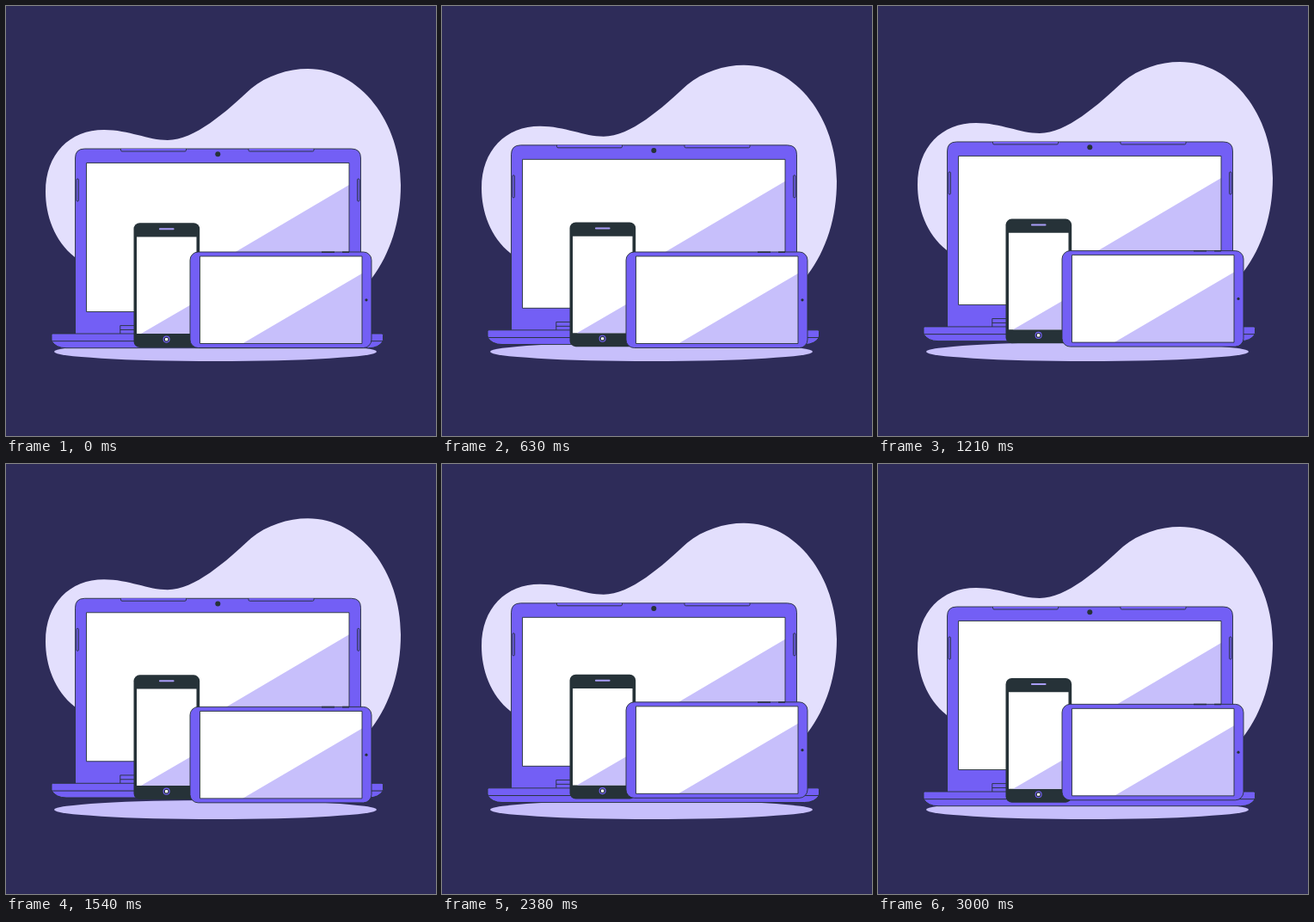
An HTML page for the animation above (3.04 s loop, 500 by 500 pixels).

```html
<!DOCTYPE html>
<html lang="en">
<head>
<meta charset="utf-8">
<title>Floating devices</title>
<style>
  html, body { margin: 0; height: 100%; overflow: hidden; background: #2e2c59; }
  svg { display: block; width: 100%; height: 100%; }
  .body { fill: #735ff5; }
  .line { stroke: #263238; stroke-width: .9; }
  .dark { fill: #263238; }
  .tint { fill: #c7bffb; }
  .white { fill: #fff; }
  .none { fill: none; }
</style>
</head>
<body>
<svg viewBox="0 0 500 500">
  <g id="blob">
    <path fill="#e3dffd" d="M80 292C56 273 46 243 46 216C46 172 74 144 114 144C143 144 165 156 188 156C219 156 256 123 285 96C303 81 328 73 351 73C412 73 459 135 459 208C459 250 447 288 425 317L400 345H100Z"/>
  </g>
  <ellipse class="tint" cx="243.5" cy="402" rx="187.5" ry="11"/>

  <g id="laptop">
    <path class="body line" d="M80.5 382V177Q80.5 166 91.5 166H401.5Q412.5 166 412.5 177V382Z"/>
    <path class="white" d="M93.5 182.5H399V355.5H93.5Z"/>
    <path class="tint" d="M399 208V355.5H149Z"/>
    <path class="none line" d="M93.5 182.5H399V355.5H93.5Z"/>
    <path class="body line" d="M133.5 166V167.5Q133.5 169 135 169H208Q209.5 169 209.5 167.5V166M282 166V167.5Q282 169 283.5 169H356.5Q358 169 358 167.5V166"/>
    <rect class="body line" x="82" y="201" width="2.4" height="26" rx="1"/>
    <rect class="body line" x="408.6" y="201" width="2.4" height="26" rx="1"/>
    <circle class="dark" cx="246.3" cy="172.2" r="3"/>
    <path class="none line" d="M132.8 381V371.6H360V381M132.8 376.5H360"/>
    <path class="body line" d="M53 389.5Q58 397.7 70 397.7H421.5Q433.500 397.7 438.500 389.5Z"/>
    <rect class="body line" x="53" y="381" width="385.5" height="8.700" rx="1.500"/>
  </g>

  <g id="phone">
    <rect class="dark" x="148.500" y="252.300" width="76.700" height="144.700" rx="7"/>
    <path class="white" d="M152 268.500H221.500V381H152Z"/>
    <path class="tint" d="M157 381L221.500 343.500V381Z"/>
    <rect class="tint" x="178" y="258.300" width="17.500" height="2" rx=".8" style="fill:#a99df8"/>
    <circle cx="186.600" cy="387.600" r="3.500" fill="none" stroke="#735ff5" stroke-width="1.100"/>
    <rect class="white" x="185" y="386" width="3.200" height="3.200" rx=".6"/>
  </g>

  <g id="tablet">
    <rect class="body line" x="214" y="286" width="211" height="111.500" rx="9.500"/>
    <path class="white" d="M225.500 291H414V392.500H225.500Z"/>
    <path class="tint" d="M275 392.500L414 311V392.500Z"/>
    <path class="none line" d="M225.500 291H414V392.500H225.500Z"/>
    <path class="dark" d="M367 285.400H382V287H367ZM391 285.400H399V287H391Z"/>
    <circle class="dark" cx="419" cy="341.800" r="1.600"/>
  </g>
</svg>
<script>
  const LOOP = 3040, FPS = 24, LAST = 72, RISE = 10, HALF = 1.5;
  const delays = { blob: 0, laptop: 0, phone: .5, tablet: 1 };

  // Linear rise and fall; the loop cuts delayed parts off mid-flight.
  const lift = s => s <= 0 ? 0 : RISE * Math.max(0, 1 - Math.abs(s / HALF - 1));

  function draw(now) {
    const t = now % LOOP;
    const step = Math.min(LAST, Math.floor((t + 5) * FPS / 1000));
    for (const id in delays) {
      const y = -lift(step / FPS - delays[id]);
      document.getElementById(id).setAttribute("transform", `translate(0 ${y})`);
    }
  }

  const start = performance.now();
  function tick() {
    draw(performance.now() - start);
    requestAnimationFrame(tick);
  }
  tick();
</script>
</body>
</html>
```
